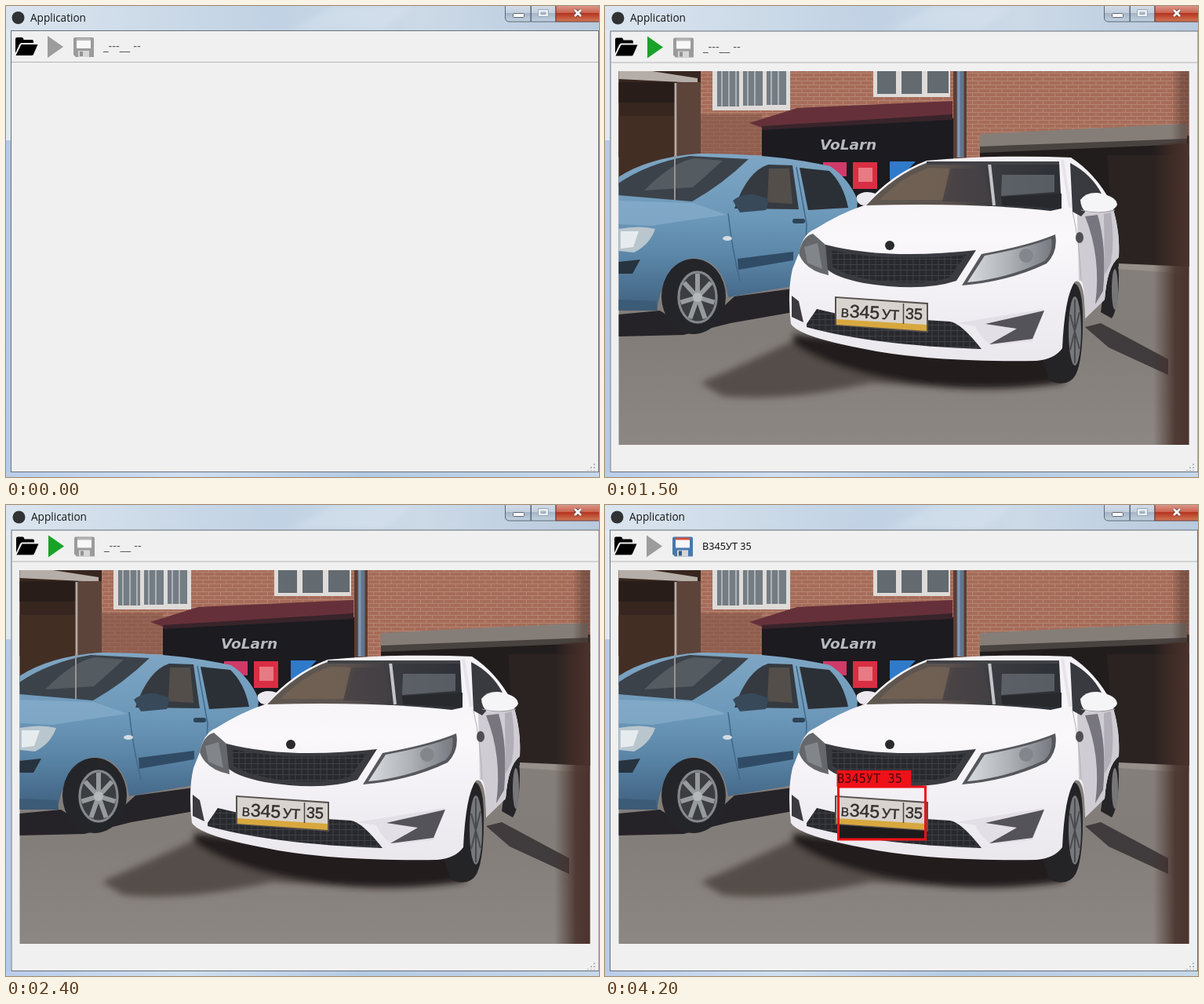
An HTML page for the animation above (5 s loop, 756 by 600 pixels).

```html
<!DOCTYPE html>
<html lang="en">
<head>
<meta charset="utf-8">
<title>Application</title>
<style>
html, body { margin: 0; width: 100%; height: 100%; overflow: hidden; background: #c6d6ea; }
svg { display: block; width: 756px; height: 600px; }
.ui { font-family: "Open Sans", "Noto Sans", sans-serif; }
.plate { font-family: "Liberation Sans", Arial, sans-serif; fill: #34302f; stroke: #34302f; stroke-width: .5; }
</style>
</head>
<body>
<svg viewBox="0 0 756 600" xmlns="http://www.w3.org/2000/svg">
<defs>
  <linearGradient id="bar"><stop offset="0" stop-color="#dbe5ef"/><stop offset=".2" stop-color="#cfdce9"/><stop offset=".45" stop-color="#c1d2e4"/><stop offset=".7" stop-color="#ccd9e7"/><stop offset="1" stop-color="#b8cadd"/></linearGradient>
  <linearGradient id="foot"><stop offset="0" stop-color="#b9cdea"/><stop offset=".3" stop-color="#d0dff0"/><stop offset=".6" stop-color="#b4cbe4"/><stop offset="1" stop-color="#c6d8ea"/></linearGradient>
  <linearGradient id="side" x2="0" y2="1"><stop offset="0" stop-color="#b6c9e6"/><stop offset="1" stop-color="#b4cbe9"/></linearGradient>
  <linearGradient id="btn" x2="0" y2="1"><stop offset="0" stop-color="#d3dde8"/><stop offset=".45" stop-color="#c3d0de"/><stop offset=".5" stop-color="#a5b5c7"/><stop offset="1" stop-color="#c2d1df"/></linearGradient>
  <linearGradient id="shut" x2="0" y2="1"><stop offset="0" stop-color="#dc9a8c"/><stop offset=".45" stop-color="#cb6653"/><stop offset=".5" stop-color="#b63420"/><stop offset="1" stop-color="#d07a58"/></linearGradient>
  <linearGradient id="road" x2="0" y2="1"><stop offset="0" stop-color="#8b8581"/><stop offset=".7" stop-color="#837d79"/><stop offset="1" stop-color="#8d8783"/></linearGradient>
  <linearGradient id="blue" x2="0" y2="1"><stop offset="0" stop-color="#7fa6c4"/><stop offset=".4" stop-color="#6c98b9"/><stop offset=".65" stop-color="#5b86a8"/><stop offset="1" stop-color="#3f607f"/></linearGradient>
  <linearGradient id="white" x2="0" y2="1"><stop offset="0" stop-color="#f3f1f5"/><stop offset=".4" stop-color="#faf8fb"/><stop offset="1" stop-color="#eae7ed"/></linearGradient>
  <linearGradient id="lamp"><stop offset="0" stop-color="#d7dade"/><stop offset=".5" stop-color="#aeb2b7"/><stop offset="1" stop-color="#777a80"/></linearGradient>
  <linearGradient id="glass"><stop offset="0" stop-color="#5f5750"/><stop offset=".4" stop-color="#5c534f"/><stop offset=".65" stop-color="#3a3b40"/><stop offset="1" stop-color="#2d3036"/></linearGradient>
  <linearGradient id="edge"><stop offset="0" stop-color="#47302a" stop-opacity="0"/><stop offset=".6" stop-color="#452e28" stop-opacity=".85"/><stop offset="1" stop-color="#4b332d"/></linearGradient>
  <pattern id="brick" width="15" height="10" patternUnits="userSpaceOnUse">
    <rect width="15" height="10" fill="#a66c59"/>
    <path d="M0 .5H15M0 5.500H15M3.500 0V5M11 5V10" stroke="#b48674"/>
  </pattern>
  <pattern id="mesh" width="8" height="7" patternUnits="userSpaceOnUse">
    <rect width="8" height="7" fill="#28292d"/>
    <path d="M0 .5H8M1 0V7" stroke="#404146"/>
  </pattern>
  <filter id="soft" x="-20%" y="-40%" width="140%" height="180%"><feGaussianBlur stdDeviation="4"/></filter>
  <clipPath id="crop"><rect x="17.5" y="83" width="727" height="476"/></clipPath>
</defs>

<rect width="756" height="600" fill="url(#bar)"/>
<path d="M420 0H520L480 31H360Z" fill="#e4edf5" opacity=".3" filter="url(#soft)"/>
<rect y="31" width="6" height="140" fill="#e0e9f2"/>
<rect y="171" width="6" height="429" fill="url(#side)"/>
<rect y="594" width="756" height="6" fill="url(#foot)"/>

<g stroke="#5b6673">
  <path d="M636.500 -1V15Q636.500 20 642 20H669V-1Z" fill="url(#btn)"/>
  <path d="M669.500 -1H701V20H669.500Z" fill="url(#btn)"/>
  <path d="M701 -1H757V20H701Z" fill="url(#shut)" stroke="#6b3434"/>
  <rect x="646.500" y="9.500" width="14" height="5" rx="1" fill="#fff"/>
  <path d="M678.500 4.500H691.500V13.500H678.500ZM682 8H688V10.500H682Z" fill="#e9eff5" fill-rule="evenodd" stroke="#9aa8b6"/>
</g>
<path d="M725 5L733 13M733 5L725 13" stroke="#5d4040" stroke-width="4.500"/>
<path d="M725 5L733 13M733 5L725 13" stroke="#fff" stroke-width="2.700"/>

<rect id="pane" x="6.500" y="31.500" width="749" height="562" fill="#f0f0f0" stroke="#68717b"/>
<path id="rule" d="M7 71.500H755" stroke="#b4b4b4"/>
<path d="M750 583v2m0 2v2m0 2v1M746 587v2m0 2v1M742 591v1" stroke="#b8b8b8" stroke-width="2"/>

<g id="tools">
  <circle cx="15.500" cy="15" r="8" fill="#303234"/>
  <text class="ui" x="31" y="19.500" font-size="13.600" fill="#151515">Application</text>
  <path d="M12 60V42Q12 40 14 40H20Q22 40 22.500 43H33Q35 43 35 45V47H20Q18 47 17 49Z"/>
  <path d="M19.500 49H40.500L35 61.500Q34.500 63 32.500 63H12.500Z"/>
  <path id="play" d="M53 38L73 52L53 66Z"/>
  <g id="disk">
    <path id="shell" d="M88 40H110Q112 40 112 42V65H89L86 62V42Q86 40 88 40Z"/>
    <rect x="90" y="42" width="18" height="12" fill="#f8f8f8"/>
    <path id="stripe" d="M90 42.500H108" stroke-width="3"/>
    <rect x="92" y="57" width="14" height="8" fill="#d6d6d6"/>
    <rect id="slot" x="94" y="58" width="4" height="6"/>
  </g>
  <text id="status" x="124" y="56"></text>
</g>

<g id="photo" clip-path="url(#crop)">
  <rect x="17" y="83" width="728" height="477" fill="url(#road)"/>
  <rect x="17" y="83" width="728" height="110" fill="url(#brick)"/>
  <!-- porch -->
  <path d="M17 83H122V192H17Z" fill="#37261f"/>
  <path d="M17 140H88V230H17Z" fill="#432e24"/>
  <path d="M17 83H60L118 92V98L17 93Z" fill="#b5aea8"/>
  <path d="M17 97L118 97V123H17Z" fill="#291d1a"/>
  <path d="M92 97H122V192H92Z" fill="#5d443a"/>
  <path d="M90 98V195" stroke="#b5a8a0" stroke-width="3"/>
  <!-- windows -->
  <path d="M137 83H236V133H137Z" fill="#dedbd9"/>
  <path d="M143 83H171V128H143ZM176 83H201V127H176ZM206 83H231V126H206Z" fill="#747c84"/>
  <path d="M149 83V128M158 83V128M167 83V128M182 83V127M191 83V127M212 83V126M221 83V126" stroke="#c3c4c6" stroke-width="1.500"/>
  <path d="M342 83H440V116H342Z" fill="#dedbd9"/>
  <path d="M347 83H371V112H347ZM378 83H404V112H378ZM411 83H438V111H411Z" fill="#636a70"/>
  <path d="M122 138H200V190H122Z" fill="#7c5144" opacity=".5"/>
  <!-- shop -->
  <path d="M200 153L444 143V260H200Z" fill="#1b1b20"/>
  <path d="M184 149L245 130L443 121V139L200 155Z" fill="#66303a"/>
  <path d="M200 153L443 138V145L200 158Z" fill="#38242a"/>
  <text x="274" y="183" font-family="'DejaVu Sans', sans-serif" font-size="18.500" font-weight="bold" font-style="italic" fill="#b9bac0">VoLarn</text>
  <path d="M278 199H308V217H278Z" fill="#cf3a68"/>
  <path d="M316 199H347V233H316Z" fill="#d92e43"/>
  <path d="M323 206H341V224H323Z" fill="#e77a82"/>
  <path d="M363 198H396L374 222H363Z" fill="#2f7ac9"/>
  <path d="M444 83H461V194H444Z" fill="#5c3c33"/>
  <path d="M453 83V193" stroke="#60758c" stroke-width="9"/>
  <path d="M451 83V193" stroke="#8298ae" stroke-width="3"/>
  <!-- garage -->
  <path d="M478 175L745 165V332H478Z" fill="#221d1d"/>
  <path d="M640 190H745V332H650Z" fill="#2a2321"/>
  <path d="M478 163L742 150V171L478 181Z" fill="#857e78"/>
  <path d="M478 179L742 169V176L478 187Z" fill="#494340"/>
  <path d="M655 328L745 332V341L655 335Z" fill="#968f8a"/>
  <!-- shadows -->
  <g filter="url(#soft)">
    <path d="M122 480Q180 455 245 424L420 440H580V480Q510 493 340 480Q230 505 150 497Z" fill="#554d49"/>
    <path d="M240 418L400 435H585V480Q490 494 400 482Q290 466 240 430Z" fill="#221e1f"/>
  </g>
  <path d="M17 393L70 388L115 416L165 370L240 360V390L160 404L100 419L17 421Z" fill="#252328"/>
  <path d="M612 409L632 404L718 450V470L642 435Z" fill="#403b3c"/>

  <!-- blue car -->
  <path d="M17 218Q55 193 120 188Q210 187 287 204Q311 220 322 247L320 280L250 355L157 371Q150 322 112 321Q75 328 66 388H17Z" fill="url(#blue)"/>
  <path d="M17 248L112 251L155 266Q110 272 60 280L17 278Z" fill="#8cb2cf" opacity=".6"/>
  <path d="M17 241V226Q55 200 108 191L183 195Q150 227 111 249Z" fill="#3b424a"/>
  <path d="M50 235Q85 199 114 194L150 197L112 231Z" fill="#6e7478" opacity=".5"/>
  <path d="M89 190V247" stroke="#9a938e" stroke-width="2"/>
  <path d="M165 258Q181 211 208 202L239 203L247 259Z" fill="#353a40"/>
  <path d="M209 207H235L239 252L207 250Z" fill="#655a50" opacity=".65"/>
  <path d="M248 206L286 210Q304 227 310 257L259 260Z" fill="#2b3036"/>
  <path d="M244 205L257 278L254 350M157 264Q162 310 172 350" fill="none" stroke="#41678a" stroke-width="1.500"/>
  <path d="M163 248Q173 239 190 240L209 246L205 260L172 263Z" fill="#38495a"/>
  <path d="M169 322L240 313V324L170 336Z" fill="#304b65"/>
  <rect x="239" y="271" width="16" height="6" rx="3" fill="#2d4356"/>
  <ellipse cx="156" cy="296" rx="6" ry="3" fill="#d4dce3"/>
  <path d="M17 284Q45 279 64 284Q57 304 37 314L17 312Z" fill="#b9c6ce"/>
  <path d="M20 287H43L36 307L20 309Z" fill="#e6ecee"/>
  <path d="M17 326L45 323L35 341H17Z" fill="#27333f"/>
  <path d="M17 374L65 376L67 388H17Z" fill="#3c5b76"/>
  <ellipse cx="113" cy="370" rx="41" ry="48" fill="#242529"/>
  <ellipse cx="118" cy="371" rx="26" ry="34" fill="#3b3d41"/>
  <ellipse cx="118" cy="371" rx="24" ry="32" fill="none" stroke="#85898d" stroke-width="3"/>
  <g id="spokes" stroke="#989b9e" stroke-width="6"></g>
  <circle cx="118" cy="371" r="6" fill="#b5b8ba"/>

  <!-- white car -->
  <path d="M640 330Q656 310 655 350Q654 386 646 398L632 390Z" fill="#252426"/>
  <ellipse cx="650" cy="361" rx="4" ry="26" fill="#77777a"/>
  <path d="M555 440L585 360Q607 337 609 390Q610 450 600 470Q590 487 566 477Z" fill="#242326"/>
  <path d="M247 315Q252 290 268 284Q300 264 330 254Q365 214 410 197Q500 189 594 193Q625 213 645 250Q657 285 655 320Q640 332 637 374L612 398Q612 345 599 351Q586 370 583 436Q573 450 550 452Q410 454 326 436Q247 421 237 405Q232 365 239 335Z" fill="url(#white)"/>
  <path d="M602 264L648 258Q657 290 655 320Q640 332 637 374L612 398Q612 345 604 350Z" fill="#cfccd3"/>
  <path d="M333 254Q370 214 412 199H579L582 258L568 261Q470 250 333 254Z" fill="url(#glass)"/>
  <path d="M350 247Q380 216 414 206L445 207L435 247Z" fill="#8b7158" opacity=".4"/>
  <path d="M440 207H482L492 250L430 249Z" fill="#454044" opacity=".8"/>
  <path d="M490 200L496 254" stroke="#c4c5c8" stroke-width="4"/>
  <path d="M506 215H573V237L505 242Z" fill="#737a80" opacity=".6"/>
  <path d="M505 243L582 239V258L506 254Z" fill="#28292d"/>
  <path d="M410 200H579" stroke="#424246" stroke-width="4"/>
  <path d="M583 196L593 257" stroke="#e6e4e9" stroke-width="4"/>
  <path d="M593 200Q620 214 633 239L607 268L596 262Z" fill="#393a3f"/>
  <path d="M612 268L628 266Q640 306 635 363L625 380Q633 320 612 268Z" fill="#77757d"/>
  <path d="M636 265L645 263Q650 300 645 327L637 342Z" fill="#b1aeb7"/>
  <path d="M596 262Q605 300 607 350" fill="none" stroke="#b2b0b6"/>
  <ellipse cx="605" cy="295" rx="5" ry="7" fill="#4f4f53"/>
  <path d="M606 247Q613 237 628 238Q652 242 653 253Q649 265 615 263Q607 260 606 247Z" fill="#f5f4f7"/>
  <path d="M607 260Q628 266 650 260" fill="none" stroke="#99979d"/>
  <path d="M321 242Q330 234 345 239L330 254Q320 253 321 242Z" fill="#eceaf0"/>
  <path d="M247 315Q251 294 265 290L282 305L285 343Q255 337 247 315Z" fill="#65676b"/>
  <path d="M254 307L271 302L277 335L258 327Z" fill="#828589"/>
  <path d="M281 304Q358 324 473 311L448 350Q403 365 330 353Q295 346 284 336Z" fill="#3a3b40"/>
  <path d="M288 311Q360 327 460 317L439 346Q398 358 335 348Q302 341 290 332Z" fill="url(#mesh)"/>
  <circle cx="363" cy="305" r="6" fill="#292a2d"/>
  <path d="M455 356L480 316Q541 305 574 291Q578 313 563 328Q515 351 455 356Z" fill="#55575c"/>
  <path d="M462 352L484 318Q538 308 569 296Q572 314 560 325Q514 347 462 352Z" fill="url(#lamp)"/>
  <circle cx="537" cy="318" r="9" fill="#83868a"/>
  <path d="M238 369L247 376L253 403L238 396Z" fill="#3b3a3f"/>
  <path d="M257 405L270 386L300 393L440 402Q454 404 480 437Q340 432 257 409Z" fill="url(#mesh)"/>
  <path d="M448 404L560 386L545 427L492 432Q479 423 472 408Z" fill="#e2dfe6"/>
  <path d="M485 405L560 388L545 424L490 431L525 411Z" fill="#55535a"/>
  <ellipse cx="599" cy="414" rx="8" ry="44" fill="#77787c"/>
  <path d="M599 374V455M593 393L605 437M605 390L593 438" stroke="#4b4b4f" stroke-width="2"/>

  <path d="M293 370L412 378V416L293 407Z" fill="#57524f"/>
  <path d="M295 372L410 380V408L295 400Z" fill="#d8d3ce"/>
  <path d="M295 399L410 406V414L295 406Z" fill="#d8a83f"/>
  <path d="M380.500 379V405" stroke="#4a4644" stroke-width="1.500"/>
  <g class="plate" transform="rotate(3.200 302 396)">
    <text x="300.500" y="396" font-size="15.500">В</text>
    <text x="311.500" y="396" font-size="23">345</text>
    <text x="352.500" y="396" font-size="18">УТ</text>
    <text x="382.500" y="394" font-size="20">35</text>
  </g>
  <rect x="699" y="175" width="46" height="385" fill="url(#edge)"/>
  <rect x="722" y="83" width="23" height="95" fill="url(#edge)" opacity=".5"/>

  <g id="found">
    <path d="M299 408L408 415V425H299Z" fill="#1d1a1c"/>
    <rect x="297.500" y="359" width="111" height="67" fill="none" stroke="#ee1118" stroke-width="3"/>
    <rect x="295.500" y="338" width="95" height="21" fill="#ee1118"/>
    <text x="296" y="353.500" font-family="'DejaVu Sans Mono', monospace" font-size="15.300" fill="#4a0a10">В345УТ 35</text>
  </g>
</g>
</svg>
<script>
const LOOP = 5000;
const $ = id => document.getElementById(id);
const set = (id, attrs) => {
  for (const k in attrs) $(id).setAttribute(k, attrs[k]);
};

$("spokes").innerHTML = Array.from({ length: 7 }, (_, i) => {
  const a = (i + .25) * 2 * Math.PI / 7;
  const x = 118 + 22 * Math.cos(a), y = 371 + 30 * Math.sin(a);
  return `<path d="M118 371L${x} ${y}"/>`;
}).join("");

const steps = [
  { until: 1500, dx: 0, dy: 0 },
  { until: 3000, dx: 1, dy: .5, open: true, ready: true },
  { until: LOOP, dx: 0, dy: .5, open: true, done: true }
];
let shown;

function draw(t) {
  const s = steps.find(p => t < p.until);
  if (s === shown) return;
  shown = s;
  set("tools", { transform: `translate(${s.dx} ${s.dy})` });
  set("pane", { x: 6.5 + s.dx * .5, y: s.open ? 32 : 31.5, height: s.open ? 561.5 : 562 });
  set("rule", { transform: `translate(0 ${s.dy})` });
  set("photo", { visibility: s.open ? "visible" : "hidden" });
  set("found", { display: s.done ? "inline" : "none" });
  set("play", { fill: s.ready ? "#18a328" : "#9c9c9c" });
  set("shell", { fill: s.done ? "#4878ab" : "#9b9b9b" });
  set("stripe", { stroke: s.done ? "#d0523e" : "#b5b5b5" });
  set("slot", { fill: s.done ? "#385c80" : "#929292" });
  set("status", {
    "font-family": s.done ? "'Noto Sans', sans-serif" : "'DejaVu Sans', sans-serif",
    "font-size": s.done ? 12.7 : 13.2,
    fill: s.done ? "#111" : "#555"
  });
  $("status").textContent = s.done ? "В345УТ 35" : "_---__ --";
}

function tick() {
  draw(performance.now() % LOOP);
  requestAnimationFrame(tick);
}
tick();
</script>
</body>
</html>
```
